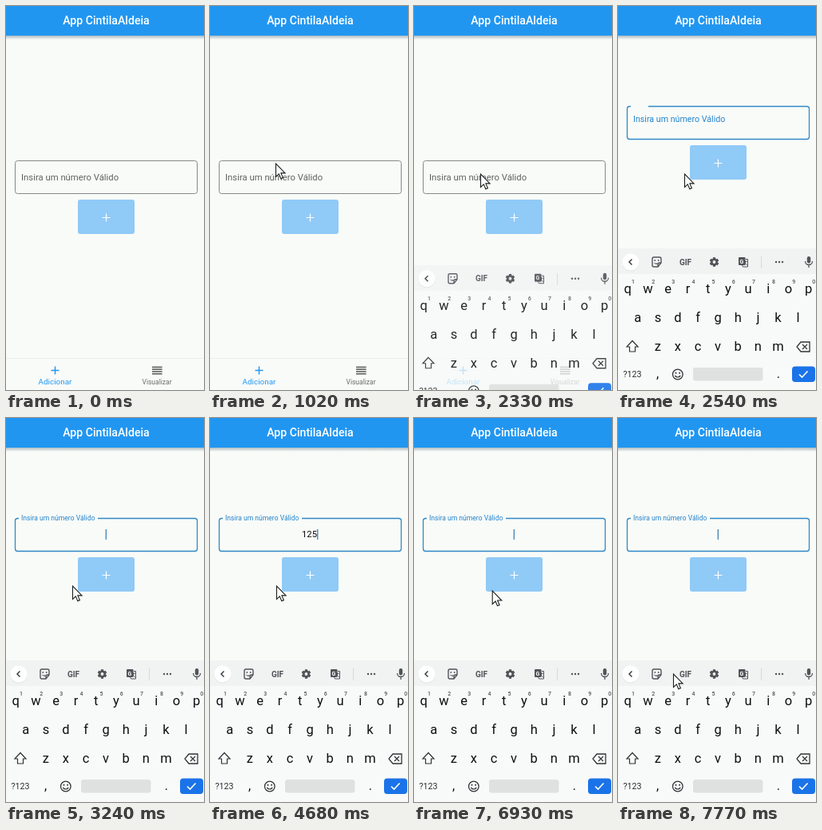
Recreate the animation shown at these times as an HTML page with a canvas. Size 248 by 480 pixels, loop 8000 ms.

```html
<!DOCTYPE html>
<html lang="pt-BR">
<head>
<meta charset="utf-8">
<title>Adicionar</title>
<style>
html, body { margin: 0; width: 100%; height: 100%; overflow: hidden; background: #f9fbf8; }
canvas { display: block; width: 248px; height: 480px; }
</style>
</head>
<body>
<canvas id="stage"></canvas>
<script>
const W = 248, H = 480, LOOP = 8000;
const BLUE = '#2196f1', PAPER = '#f9fbf8', INK = '#0e0f10', GRAY = '#505458';
const canvas = document.getElementById('stage');
const g = canvas.getContext('2d');
const ratio = window.devicePixelRatio || 1;
canvas.width = W * ratio;
canvas.height = H * ratio;

const clamp = v => Math.max(0, Math.min(1, v));
const mix = (a, b, p) => a + (b - a) * p;
const span = (t, a, b) => clamp((t - a) / (b - a));
const smooth = p => p * p * (3 - 2 * p);

function text(str, x, y, size, color, align = 'center', weight = 400) {
  g.font = `${weight} ${size}px Roboto, sans-serif`;
  g.textAlign = align;
  g.textBaseline = 'alphabetic';
  g.fillStyle = color;
  g.fillText(str, x, y);
}

function box(x, y, w, h, r, color) {
  g.beginPath();
  g.roundRect(x, y, w, h, r);
  g.fillStyle = color;
  g.fill();
}

function rect(x, y, w, h, color) {
  g.fillStyle = color;
  g.fillRect(x, y, w, h);
}

function circle(x, y, r, fill, stroke, width = 1.3) {
  g.beginPath();
  g.arc(x, y, r, 0, Math.PI * 2);
  if (fill) { g.fillStyle = fill; g.fill(); }
  if (stroke) { g.strokeStyle = stroke; g.lineWidth = width; g.stroke(); }
}

function line(d, color, width = 1.3) {
  g.strokeStyle = color;
  g.lineWidth = width;
  g.stroke(new Path2D(d));
}

function plus(x, y, size, color, width) {
  line(`M${x - size} ${y}h${size * 2}M${x} ${y - size}v${size * 2}`, color, width);
}

function drawAppBar() {
  const shade = g.createLinearGradient(0, 37, 0, 42);
  shade.addColorStop(0, 'rgba(60,90,110,.4)');
  shade.addColorStop(1, 'rgba(60,90,110,0)');
  rect(0, 37, W, 5, shade);
  rect(0, 0, W, 37, BLUE);
  text('App CintilaAldeia', 125.5, 22.5, 14.1, '#fff', 'center', 500);
}

function drawNav() {
  rect(0, 440, W, 1, '#eceeeb');
  plus(61.5, 455.5, 5, BLUE, 1.4);
  text('Adicionar', 61.5, 473, 9.9, BLUE);
  for (let i = 0; i < 4; i++) rect(183, 450.6 + i * 2.8, 12.6, 1.6, '#606261');
  text('Visualizar', 189, 473, 8.5, '#6a6d6b');
}

// Typing moments, in ms
const keyTimes = [4190, 4400, 4610, 4790, 4940];
const CLEAR = 6600;

function typed(t) {
  return t >= CLEAR ? '' : '12574'.slice(0, keyTimes.filter(k => t >= k).length);
}

function caretAlpha(t) {
  const since = [2700, ...keyTimes, 5940, CLEAR + 30, 7640].filter(k => t >= k).pop();
  if (since === undefined) return 0;
  return 1 - span(t - since, since === 2700 ? 1010 : 500, since === 2700 ? 1210 : 570);
}

function drawForm(t) {
  const y = t >= 2540 ? 125 : 193;
  const focus = smooth(span(t, 2480, 2680));
  const focused = t >= 2480;

  g.beginPath();
  g.roundRect(11.5, y + 0.5, 228, 41, 3);
  g.strokeStyle = focused ? '#3088c6' : '#858987';
  g.lineWidth = focused ? 1.3 : 1;
  g.stroke();
  if (focus > 0) rect(16, y - 2, 99 * focus, 4, PAPER);
  text('Insira um número Válido', 19, y + mix(25, 3, focus), mix(11.3, 8.55, focus),
    focused ? '#2383cc' : '#5e6260', 'left');

  const value = typed(t);
  text(value, 124.5, y + 24, 11.3, INK);
  g.globalAlpha = caretAlpha(t);
  rect(124.7 + g.measureText(value).width / 2, y + 14, 1.2, 13, '#3478ab');
  g.globalAlpha = 1;

  box(90, y + 49, 71, 43, 3, '#90caf7');
  const press = span(t, 6450, 6600) * (1 - span(t, 6650, 6900));
  if (press > 0) box(90, y + 49, 71, 43, 3, `rgba(255,255,255,${0.2 * press})`);
  plus(125.5, y + 71.5, 5, '#fff', 1.2);
}

function drawToolbar() {
  circle(16, 321, 10.5, '#e1e4e4');
  circle(16, 320, 10.5, '#fff');
  line('M17.5 316.5L14 320l3.5 3.5', '#303336', 1.4);

  line('M43 316q0-2 2-2h7q2 0 2 2v5l-4 5h-5q-2 0-2-2zM54 321h-2q-2 0-2 2v3', GRAY, 1.4);
  circle(46.3, 318, 0.9, GRAY);
  circle(50.7, 318, 0.9, GRAY);
  line('M45.5 321q2 2.4 4 .5', GRAY, 1.1);

  text('GIF', 84.5, 323.5, 10, GRAY, 'center', 700);

  for (let i = 0; i < 6; i++) {
    const a = i * Math.PI / 3 + Math.PI / 6;
    line(`M120.5 320l${5.8 * Math.cos(a)} ${5.8 * Math.sin(a)}`, GRAY, 3.2);
  }
  circle(120.5, 320, 3.2, '#f1f3f3', GRAY, 2.6);

  box(151, 314, 8.5, 10, 1, GRAY);
  text('G', 155, 321.7, 7, '#fff', 'center', 700);
  line('M160 316.5h2.5v9.5h-6l-1-2M157.5 319.5h4M159.5 318.5v1q0 2-2 4M158.5 320.5l3 3.5', GRAY, 1);

  rect(179, 313, 1, 15, '#d7dada');
  for (const x of [198, 202, 206]) circle(x, 320, 1.2, GRAY);

  box(236.8, 313, 4.4, 8.5, 2.2, GRAY);
  line('M234.5 319a4.5 4.5 0 0 0 9 0M239 323.5v3.5', GRAY, 1.3);
}

function drawKeys() {
  [...'qwertyuiop'].forEach((key, i) => {
    const x = 12.2 + i * 25.15;
    text(key, x, 358.8, 16.5, INK);
    text(String((i + 1) % 10), x + 6.8, 347, 7, GRAY, 'center', 500);
  });
  [...'asdfghjkl'].forEach((key, i) => text(key, 24.8 + i * 25.1, 394.8, 16.5, INK));
  [...'zxcvbnm'].forEach((key, i) => text(key, 49.8 + i * 25.1, 430.8, 16.5, INK));

  line('M18 418.5l-7 7.5h3.5v6h7v-6h3.5z', '#303336', 1.2);
  line('M229 420h11v12h-11l-5-6zM231 423l6 6m0-6l-6 6', '#303336', 1.3);

  text('?123', 18, 464.4, 10.6, '#2a2d30');
  text(',', 49.5, 465, 16, INK);
  circle(74.8, 460.5, 6.3, null, '#303336', 1.3);
  circle(72.5, 458.8, 1, '#303336');
  circle(77.1, 458.8, 1, '#303336');
  line('M71.3 462q3.5 4 7 0', '#303336', 1.2);
  box(94, 452, 87.5, 16.5, 3, '#dfe1e0');
  text('.', 200.8, 465, 16, INK);
  box(218, 450.5, 29, 19.5, 4, '#1a73e8');
  line('M227 460.5l3.5 3.5 7-7.5', '#fff', 1.7);
}

function drawKeyboard(t) {
  if (t < 2260) return;
  const p = span(t, 2260, 2514);
  const alpha = clamp(0.35 + 1.45 * p);
  g.save();
  g.translate(0, 40 * (1 - p) ** 2);
  g.globalAlpha = alpha;
  rect(0, 303, W, 32, '#f1f3f3');
  rect(0, 335, W, 200, '#f8faf9');
  g.globalAlpha = alpha ** 0.4;
  drawToolbar();
  drawKeys();
  g.restore();
}

// Pointer stops: time, x, y
const stops = [
  [70, 62, 478], [810, 82, 200], [1020, 82, 197], [1360, 82, 197],
  [1900, 83, 210], [5640, 83, 210], [6110, 92, 204], [6300, 104, 193],
  [6750, 104, 193], [7340, 76, 296], [7490, 73, 308], [7770, 69, 320], [LOOP, 69, 320]
];

function drawPointer(t) {
  if (t < 70) return;
  const i = Math.max(1, stops.findIndex(s => s[0] > t));
  const [a, b] = [stops[i - 1], stops[i]];
  const p = smooth(span(t, a[0], b[0]));
  g.save();
  g.translate(mix(a[1], b[1], p) + 0.5, mix(a[2], b[2], p));
  const arrow = new Path2D('M0 0v16.5l3.8-3.6 2.5 5.8 2.6-1.1-2.5-5.7h5.2z');
  g.fillStyle = '#fff';
  g.fill(arrow);
  g.strokeStyle = '#1c1e1f';
  g.lineWidth = 1.1;
  g.stroke(arrow);
  g.restore();
}

function draw(t) {
  g.setTransform(ratio, 0, 0, ratio, 0, 0);
  rect(0, 0, W, H, PAPER);
  drawAppBar();
  drawForm(t);
  drawNav();
  drawKeyboard(t);
  drawPointer(t);
}

const start = performance.now();
function tick() {
  draw((performance.now() - start) % LOOP);
  requestAnimationFrame(tick);
}
tick();
</script>
</body>
</html>
```
